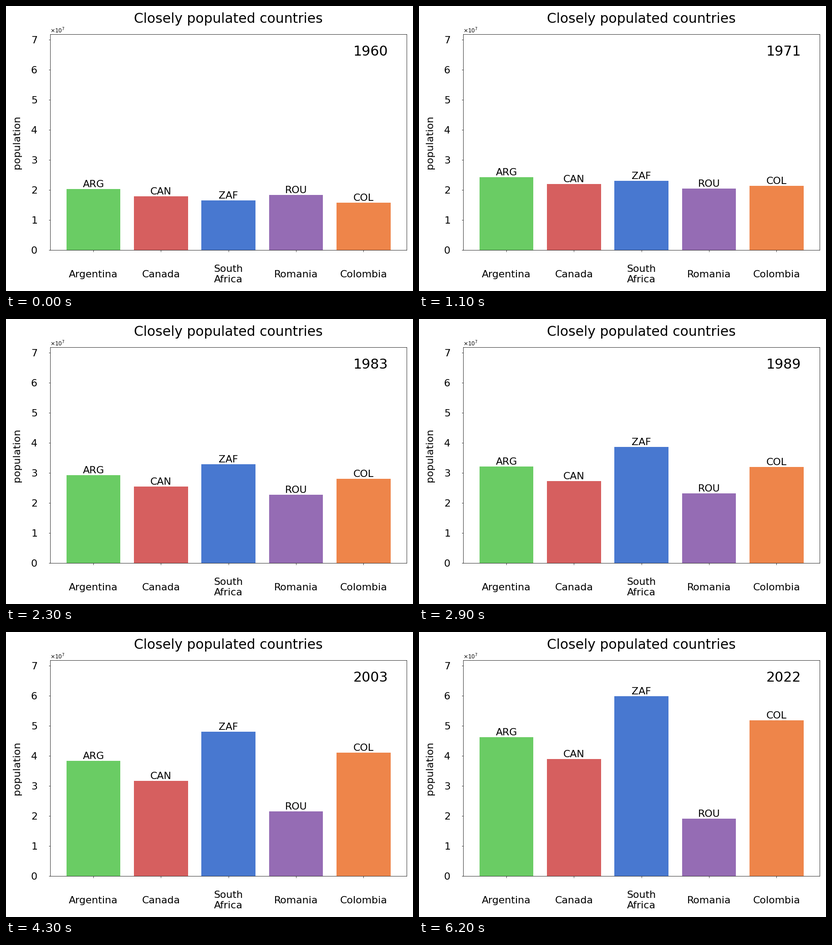
A matplotlib script that plays this animation: 894 by 626 pixels, repeating every 6.3 s.

```python
import matplotlib.pyplot as plt
import numpy as np
from matplotlib.animation import FuncAnimation

W, H, DPI = 894, 626, 72
START, YEARS = 1960, 63
LABEL_SIZE = 22

plt.rcParams["font.family"] = "DejaVu Sans"

# Name, code, colour and population in millions at each key year
KEY_YEARS = np.array([1960, 1971, 1977, 1989, 2003, 2013, 2022])
COUNTRIES = [
    ("Argentina", "ARG", "#6ACC64", [20.35, 24.2, 26.65, 32.1, 38.3, 42.2, 46.2]),
    ("Canada", "CAN", "#D65F5F", [17.9, 21.95, 23.75, 27.3, 31.65, 35.1, 38.9]),
    ("South\nAfrica", "ZAF", "#4878D0", [16.5, 23.0, 27.2, 38.6, 48.1, 53.9, 59.9]),
    ("Romania", "ROU", "#956CB4", [18.4, 20.45, 21.7, 23.15, 21.55, 20.0, 19.05]),
    ("Colombia", "COL", "#EE854A", [15.7, 21.4, 24.5, 31.95, 41.05, 46.25, 51.9]),
]


def smooth(x, xs, ys):
    """Cubic Hermite curve through the points (xs, ys)."""
    slopes = np.gradient(ys, xs)
    i = min(np.searchsorted(xs, x, side="right"), len(xs) - 1) - 1
    span = xs[i + 1] - xs[i]
    t = (x - xs[i]) / span
    ease = t * t * (3 - 2 * t)
    bend = t * (1 - t) * ((1 - t) * slopes[i] - t * slopes[i + 1])
    return ys[i] + ease * (ys[i + 1] - ys[i]) + span * bend


names, codes, colors, millions = zip(*COUNTRIES)
slots = range(len(COUNTRIES))

fig = plt.figure(figsize=(W / DPI, H / DPI), dpi=DPI, facecolor="white")
left, right, top, bottom = 97.2, 880.3, 62, 536
ax = fig.add_axes([left / W, 1 - bottom / H,
                   (right - left) / W, (bottom - top) / H])

bars = ax.bar(slots, 0, width=0.8, color=colors, linewidth=0)
tags = [ax.text(i, 0, code, size=LABEL_SIZE, ha="center", va="bottom")
        for i, code in enumerate(codes)]
year_text = ax.text(0.85, 0.9, "", size=30, transform=ax.transAxes)

ax.set_xlim(-0.64, 4.64)
ax.set_ylim(0, 1.2 * 59.89e6)
ax.set_title("Closely populated countries", size=29.8, pad=25)
fig.text(24 / W, 1 - (top + bottom) / 2 / H, "population", size=LABEL_SIZE,
         rotation=90, ha="center", va="center")

ax.set_xticks(slots, names, va="center")
ax.tick_params(axis="x", labelsize=LABEL_SIZE, pad=50)
ax.set_yticks(np.arange(8) * 1e7)
ax.ticklabel_format(axis="y", style="sci", scilimits=(0, 0), useMathText=True)
ax.tick_params(axis="y", labelsize=LABEL_SIZE, pad=25)
ax.yaxis.get_offset_text().set_fontsize(12)


def update(step):
    year = START + step
    year_text.set_text(str(year))
    for bar, tag, points in zip(bars, tags, millions):
        value = 1e6 * smooth(year, KEY_YEARS, points)
        bar.set_height(value)
        tag.set_y(value)
    return [*bars, *tags, year_text]


anim = FuncAnimation(fig, update, frames=YEARS, interval=100,
                     repeat=True, repeat_delay=0, blit=False)
plt.show()
```
